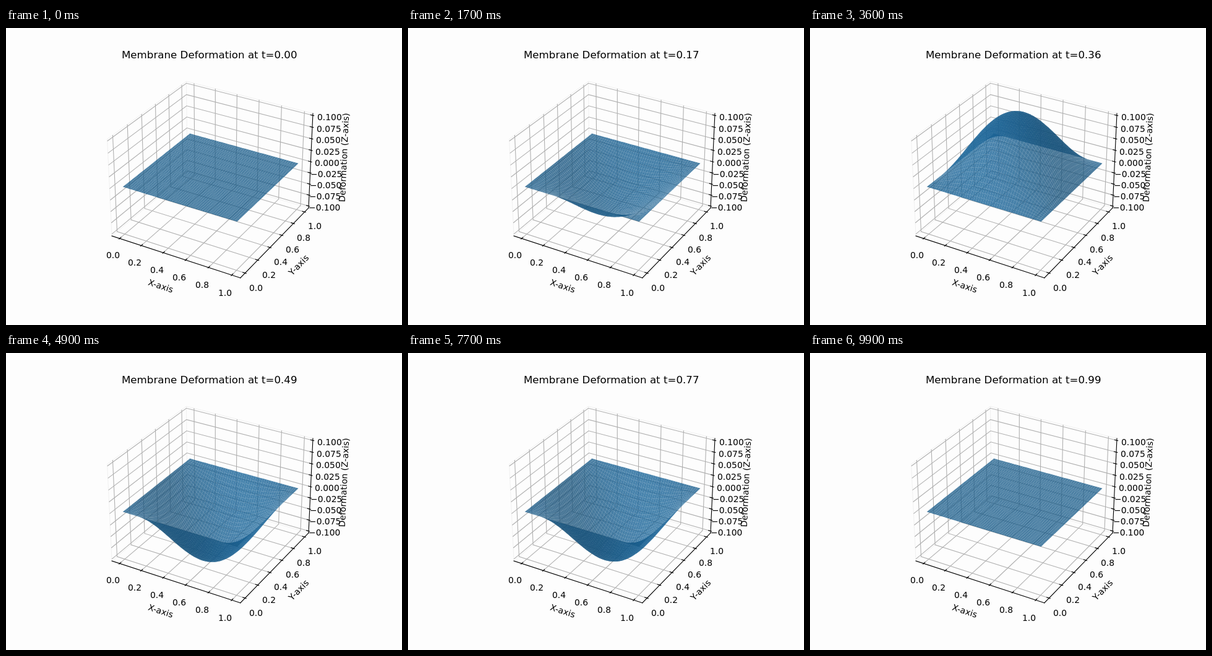
Write an HTML page with a canvas that moves like this. It is 640 by 480 pixels and loops after 10000 ms.

```html
<!DOCTYPE html>
<html>
<head>
<meta charset="utf-8">
<style>
html, body { margin: 0; width: 640px; height: 480px; overflow: hidden; background: #fdfdfd; }
canvas { display: block; }
</style>
</head>
<body>
<canvas id="stage" width="640" height="480"></canvas>
<script>
const ctx = document.getElementById('stage').getContext('2d');
const LO = -0.0729, HI = 1.0729, ZMAX = 0.10417;   // box bounds
const CELLS = 50, ALPHA = 0.8, AMP = 0.1306;
const OMEGA = 5 * Math.PI * Math.SQRT2;
const FONT = '"DejaVu Sans", sans-serif';
const S3 = Math.sqrt(3) / 2;

// Perspective view: elevation 30, azimuth -60, distance 10
function project(x, y, z) {
  const a = (x - 0.5) * 1.03896, b = (y - 0.5) * 1.03896, c = z * 4.28571;
  const depth = 10 - (a * S3 / 2 - b * 0.75 + c / 2);
  const k = 1997.8 / depth;
  return [333 + (a * S3 + b / 2) * k, 237.4 - (-a / 4 + b * S3 / 2 + c * S3) * k, depth];
}

function line(color, width, ...points) {
  ctx.beginPath();
  for (const p of points) ctx.lineTo(...project(...p));
  ctx.strokeStyle = color;
  ctx.lineWidth = width;
  ctx.stroke();
}

// Centred text on whole pixels
function text(str, x, y, size = 13.89) {
  ctx.font = size + 'px ' + FONT;
  ctx.fillStyle = '#000';
  ctx.fillText(str, Math.round(x - ctx.measureText(str).width / 2), Math.round(y));
}

function turnedText(str, x, y, angle) {
  ctx.save();
  ctx.translate(x, y);
  ctx.rotate(angle * Math.PI / 180);
  ctx.textAlign = 'center';
  ctx.font = '13.89px ' + FONT;
  ctx.fillStyle = '#000';
  ctx.fillText(str, 0, 0);
  ctx.restore();
}

function drawBox() {
  const grid = '#b0b0b0', pane = '#f1f1f1';
  ctx.lineCap = 'butt';
  line(pane, 1, [LO, LO, -ZMAX], [LO, LO, ZMAX], [LO, HI, ZMAX], [HI, HI, ZMAX]);
  line(pane, 1, [LO, LO, -ZMAX], [LO, HI, -ZMAX], [HI, HI, -ZMAX]);
  line(pane, 1, [LO, HI, -ZMAX], [LO, HI, ZMAX]);

  const levels = [...Array(9)].map((_, i) => (i - 4) / 40);
  const steps = [0, 0.2, 0.4, 0.6, 0.8, 1];
  for (const s of steps) {
    line(grid, 1.11, [s, LO, -ZMAX], [s, HI, -ZMAX], [s, HI, ZMAX]);
    line(grid, 1.11, [HI, s, -ZMAX], [LO, s, -ZMAX], [LO, s, ZMAX]);
  }
  for (const z of levels) line(grid, 1.11, [LO, LO, z], [LO, HI, z], [HI, HI, z]);

  ctx.lineCap = 'square';
  line('#000', 1.11, [LO, LO, -ZMAX], [HI, LO, -ZMAX]);
  line('#000', 1.11, [HI, LO, -ZMAX], [HI, HI, -ZMAX]);
  line('#000', 1.11, [HI, HI, -ZMAX], [HI, HI, ZMAX]);

  const out = 0.0096, into = 0.0191, pad = 0.0966, drop = ZMAX + 0.0252;
  const label = (str, p, dy) => {
    const [x, y] = project(...p);
    text(str, x, y + dy);
  };
  for (const s of steps) {
    line('#000', 1.11, [s, LO - out, -ZMAX], [s, LO + into, -ZMAX]);
    line('#000', 1.11, [HI + out, s, -ZMAX], [HI - into, s, -ZMAX]);
    label(s.toFixed(1), [s, LO - pad, -drop], 4.5);
    label(s.toFixed(1), [HI + pad, s, -drop], 4.8);
  }
  for (const z of levels) {
    line('#000', 1.11, [HI + out, HI, z], [HI - into, HI, z]);
    label(z.toFixed(3).replace('-', '\u2212'), [HI + pad, HI + pad, z], 10.8);
  }
  turnedText('X-axis', 248.5, 421.5, 18.1);
  turnedText('Y-axis', 476.4, 386.4, -45.9);
  turnedText('Deformation (Z-axis)', 551, 209.5, -87.4);
}

function drawSurface(amp) {
  const { sin, cos, PI } = Math;
  const pts = [];
  for (let j = 0; j <= CELLS; j++)
    for (let i = 0; i <= CELLS; i++) {
      const x = i / CELLS, y = j / CELLS;
      pts.push(project(x, y, amp * sin(PI * x) * sin(PI * y)));
    }

  const cells = [];
  for (let j = 0; j < CELLS; j++)
    for (let i = 0; i < CELLS; i++) {
      const n = j * (CELLS + 1) + i;
      const quad = [pts[n], pts[n + 1], pts[n + CELLS + 2], pts[n + CELLS + 1]];
      const x = PI * (i + 0.5) / CELLS, y = PI * (j + 0.5) / CELLS;
      const dx = amp * PI * cos(x) * sin(y), dy = amp * PI * sin(x) * cos(y);
      const light = (2 * dx + 2 * dy + 1) / 3 / Math.hypot(dx, dy, 1);
      cells.push({ quad, shade: 0.65 + 0.35 * light, depth: quad.reduce((s, p) => s + p[2], 0) });
    }
  cells.sort((a, b) => b.depth - a.depth);

  ctx.globalAlpha = ALPHA;
  for (const { quad, shade } of cells) {
    ctx.beginPath();
    for (const [x, y] of quad) ctx.lineTo(x, y);
    ctx.fillStyle = `rgb(${[31, 119, 180].map(v => Math.round(v * shade))})`;
    ctx.fill();
  }
  ctx.globalAlpha = 1;
}

let shown = -1;
function tick() {
  const step = Math.floor(performance.now() / 100) % 100;
  if (step !== shown) {
    shown = step;
    const t = step / 100;
    ctx.fillStyle = '#fdfdfd';
    ctx.fillRect(0, 0, 640, 480);
    drawBox();
    drawSurface(AMP * Math.sin(OMEGA * t));
    text('Membrane Deformation at t=' + t.toFixed(2), 328.4, 49, 16.67);
  }
  requestAnimationFrame(tick);
}
tick();
</script>
</body>
</html>
```
